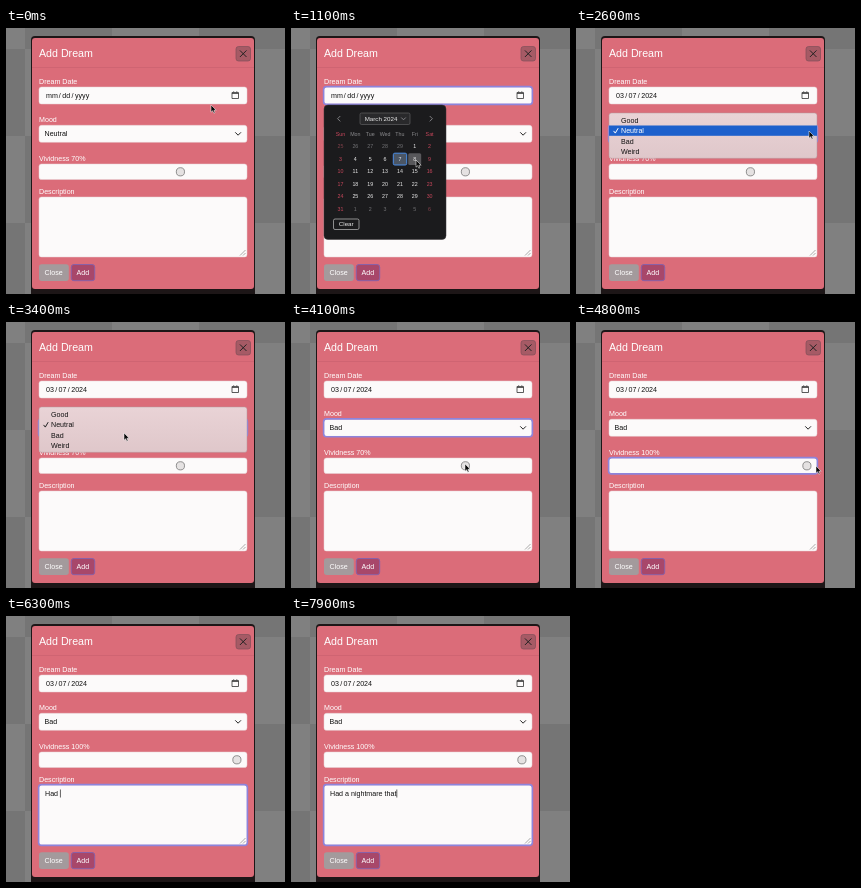
These frames come from a looping animation (279x266 px, 8 s). An HTML page:

```html
<!DOCTYPE html>
<html lang="en">
<head>
<meta charset="utf-8">
<title>Add Dream</title>
<style>
  html, body { margin: 0; width: 100%; height: 100%; overflow: hidden; background: #7c7c7c; }
  svg { display: block; width: 279px; height: 266px; }
  text { font: 7.11px "Liberation Sans", Arial, sans-serif; fill: #111; white-space: pre; }
  .label text, .button text { fill: #fff; }
  .label .title { font-size: 10.67px; }
  .field { fill: #fcfafa; stroke: #e6d3d6; stroke-width: .5; }
  .ring { fill: none; stroke: #8d84dc; stroke-width: 1.6; }
  .line { fill: none; stroke: #222; stroke-width: 1; stroke-linecap: round; stroke-linejoin: round; }
  #calendar text { font-size: 5.3px; fill: #eee; text-anchor: middle; }
  #calendar .month { font-size: 6.2px; }
  #calendar .weekday { fill: #8c8c8f; }
  #calendar .outside { fill: #737376; }
  #calendar .weekend { fill: #c9475c; }
  #calendar .outside.weekend { fill: #80404a; }
  #calendar .line { stroke: #99999c; stroke-width: .8; }
</style>
</head>
<body>
<svg viewBox="0 0 279 266">
  <defs>
    <linearGradient id="menuFill" x2="0" y2="1">
      <stop stop-color="#e9d3d6"/><stop offset="1" stop-color="#dfc7ca"/>
    </linearGradient>
  </defs>
  <g id="checks"></g>
  <path d="M25 266V12q0-4 4-4H245q4 0 4 4V266Z" fill="#1d1617"/>
  <rect x="26" y="10" width="222" height="251" rx="3" fill="#db6c79"/>
  <path d="M26 39.5H248" stroke="#c8606d" stroke-width=".6"/>

  <g class="label">
    <text class="title" x="33" y="29">Add Dream</text>
    <text x="33" y="56">Dream Date</text>
    <text x="33" y="94">Mood</text>
    <text x="33" y="132.5" id="vividness"></text>
    <text x="33" y="166">Description</text>
  </g>
  <rect x="230" y="18.5" width="14.5" height="14.5" rx="2.5" fill="#a65a65" stroke="#80505a" stroke-width=".7"/>
  <path class="line" d="M234.2 22.7l6 6m0-6l-6 6" stroke-width="1.1"/>

  <rect class="field" x="33" y="59" width="208" height="17" rx="2.6"/>
  <rect class="field" x="33" y="97.3" width="208" height="17" rx="2.6"/>
  <rect class="field" x="33" y="136" width="208" height="15.5" rx="2.6"/>
  <rect class="field" x="33" y="169" width="208" height="60" rx="2.6"/>
  <rect class="ring" id="dateRing" x="32.6" y="58.6" width="208.8" height="17.8" rx="3"/>
  <rect class="ring" id="moodRing" x="32.6" y="96.9" width="208.8" height="17.8" rx="3"/>
  <rect class="ring" id="rangeRing" x="32.6" y="135.6" width="208.8" height="16.3" rx="3"/>
  <rect class="ring" id="noteRing" x="32.6" y="168.6" width="208.8" height="60.8" rx="3"/>

  <g id="dateEmpty">
    <text x="40" y="70">mm</text><text x="52.8" y="70">/</text>
    <text x="56.3" y="70">dd</text><text x="65.4" y="70">/</text><text x="69" y="70">yyyy</text>
  </g>
  <g id="dateFilled">
    <text x="40" y="70">03</text><text x="49.2" y="70">/</text>
    <text x="52.6" y="70">07</text><text x="61.7" y="70">/</text><text x="65.2" y="70">2024</text>
  </g>
  <path d="M226 64.5h6.5v6h-6.5zM226 65.5h6.5M227.7 63.3v1M230.8 63.3v1" fill="none" stroke="#333" stroke-width=".8"/>
  <text id="mood" x="38.5" y="108.2"></text>
  <path class="line" d="M229.5 104.6l2.6 2.6 2.6-2.6"/>
  <circle id="thumb" cy="143.8" r="4.1" fill="#e5e2e2" stroke="#777" stroke-width=".8"/>
  <text id="note" x="39" y="179.7"></text>
  <path id="caret" d="M0 173.5v8" stroke="#222" stroke-width=".7"/>
  <path d="M234 227.5l5.5-5.5m-2.5 5.5l2.5-2.5" stroke="#888" stroke-width=".7"/>

  <g class="button">
    <rect x="33" y="236.3" width="29.8" height="16.6" rx="2.6" fill="#a39a9c"/>
    <text x="38.6" y="247">Close</text>
    <rect x="65.3" y="236.5" width="23.4" height="16.2" rx="2.6" fill="#a8476a" stroke="#8960a8"/>
    <text x="70.6" y="247">Add</text>
  </g>

  <g id="calendar"></g>
  <g id="menu">
    <rect x="33" y="85" width="208" height="45.3" rx="2.6" fill="url(#menuFill)" stroke="#b39a9e" stroke-width=".5"/>
    <rect id="highlight" x="33" width="208" height="10.3" fill="#1d60cc"/>
    <g id="options"></g>
    <path id="check" class="line" d="M37.8 103.2l1.5 1.9 2.7-4.6" stroke-width=".9"/>
  </g>
  <path id="pointer" d="M0 0V7.2L1.7 5.7 2.8 8.2 4 7.7 2.9 5.2H5.2Z" fill="#080808" stroke="#fff" stroke-width=".5"/>
</svg>

<script>
const $ = id => document.getElementById(id);
const LOOP = 8000, STEP = 100;

const POINTER = [
  [0, 205, 77], [100, 206, 77], [500, 230, 67], [700, 230, 67], [1000, 125, 132],
  [1100, 125, 132], [1400, 110, 131], [1600, 110, 131], [1800, 113, 132],
  [2000, 195, 114], [2100, 195, 114], [2400, 233, 103], [2700, 233, 103],
  [3200, 118, 111], [3600, 118, 111], [4000, 174, 142], [4200, 174, 142],
  [4600, 231, 144], [4700, 240, 144], [4900, 240, 144], [5300, 140, 188], [5800, 140, 188]
];
const VIVIDNESS = [[4200, 70], [4600, 100]];
const NOTE = "Had a nightmare that";
const KEY_TIMES = [5800, 5900, 6100, 6300, 6500, 6600, 6700, 7000, 7100, 7100,
  7200, 7300, 7400, 7400, 7500, 7600, 7700, 7700, 7800, 7900];
const OPTIONS = ["Good", "Neutral", "Bad", "Weird"];

function sample(track, t) {
  const next = track.findIndex(key => key[0] > t);
  if (next === 0) return track[0].slice(1);
  if (next < 0) return track[track.length - 1].slice(1);
  const [t0, ...from] = track[next - 1], [t1, ...to] = track[next];
  const p = (t - t0) / (t1 - t0), eased = p * p * (3 - 2 * p);
  return from.map((v, i) => v + (to[i] - v) * eased);
}

function buildChecks() {
  let out = "";
  for (let row = -1; row < 3; row++)
    for (let col = -1; col < 3; col++)
      out += `<rect x="${19 + col * 87}" y="${21 + row * 87}" width="87" height="87"
        fill="${(row + col) % 2 ? "#757575" : "#808080"}"/>`;
  $("checks").innerHTML = out;
}

function buildCalendar() {
  const colX = col => 49.5 + col * 14.85;
  let out = `<rect x="33" y="77" width="122" height="134.5" rx="4" fill="#1b1b1d" stroke="#3b3739" stroke-width=".5"/>
    <rect x="69" y="85" width="50" height="11.5" rx="1.5" fill="#29292b" stroke="#68686b" stroke-width=".6"/>
    <text class="month" x="90" y="93">March 2024</text>
    <path class="line" d="M110.5 89.8l2 2 2-2M49 88.3l-2.4 2.4 2.4 2.4M139 88.3l2.4 2.4-2.4 2.4"/>
    <rect x="102.3" y="125.2" width="13.4" height="11.8" rx="1.5" fill="#4b5665" stroke="#4b8ee8" stroke-width="1"/>
    <rect id="hover" x="117.2" y="125.2" width="13" height="11.8" rx="1.5" fill="#58585b"/>
    <rect x="42.5" y="191" width="25.5" height="10.5" rx="1.5" fill="#1b1b1d" stroke="#ddd" stroke-width=".6"/>
    <text class="month" x="55.2" y="198.4">Clear</text>`;
  ["Sun", "Mon", "Tue", "Wed", "Thu", "Fri", "Sat"].forEach((name, col) => {
    out += `<text class="weekday ${col % 6 ? "" : "weekend"}" x="${colX(col)}" y="107.8">${name}</text>`;
  });
  for (let i = 0; i < 42; i++) {
    const col = i % 7, day = i - 4;
    const outside = day < 1 || day > 31;
    const shown = day < 1 ? day + 29 : day > 31 ? day - 31 : day;
    out += `<text class="${outside ? "outside" : ""} ${col % 6 ? "" : "weekend"}"
      x="${colX(col)}" y="${120.4 + Math.floor(i / 7) * 12.5}">${shown}</text>`;
  }
  $("calendar").innerHTML = out;
}

function show(id, visible) {
  $(id).style.visibility = visible ? "visible" : "hidden";
}

function render(t) {
  const during = (start, end) => t >= start && t < end;
  const [x, y] = sample(POINTER, t);
  $("pointer").setAttribute("transform", `translate(${x} ${y})`);
  show("pointer", t < 5800);

  show("dateRing", during(500, 2400));
  show("moodRing", during(2400, 4200));
  show("rangeRing", during(4200, 5400));
  show("noteRing", t >= 5400);

  show("calendar", during(600, 1600));
  show("hover", during(1000, 1300));
  show("dateEmpty", t < 1500);
  show("dateFilled", t >= 1500);

  const menuOpen = during(2400, 3700);
  const active = y < 96 ? 0 : y < 107.5 ? 1 : 2;
  show("menu", menuOpen);
  show("highlight", menuOpen && !during(3400, 3500));
  $("highlight").setAttribute("y", 87.2 + active * 10.3);
  [...$("options").children].forEach((item, i) => {
    item.style.fill = i === active && !during(3400, 3500) ? "#fff" : "#111";
  });
  $("check").style.stroke = active === 1 && !during(3400, 3500) ? "#fff" : "#222";
  $("mood").textContent = t < 3600 ? "Neutral" : "Bad";

  const [level] = sample(VIVIDNESS, t);
  $("vividness").textContent = `Vividness ${Math.round(level)}%`;
  $("thumb").setAttribute("cx", 42.6 + level * 1.883);

  const typed = KEY_TIMES.filter(time => time <= t).length;
  $("note").textContent = NOTE.slice(0, typed);
  const width = typed ? $("note").getComputedTextLength() : 0;
  $("caret").setAttribute("transform", `translate(${39.4 + width} 0)`);
  show("caret", t >= 5400);
}

buildChecks();
buildCalendar();
$("options").innerHTML = OPTIONS.map((name, i) =>
  `<text x="45" y="${95 + i * 10.3}">${name}</text>`).join("");

const start = performance.now();
function tick() {
  const t = (performance.now() - start) % LOOP;
  render(Math.floor(t / STEP) * STEP);
  requestAnimationFrame(tick);
}
tick();
</script>
</body>
</html>
```
